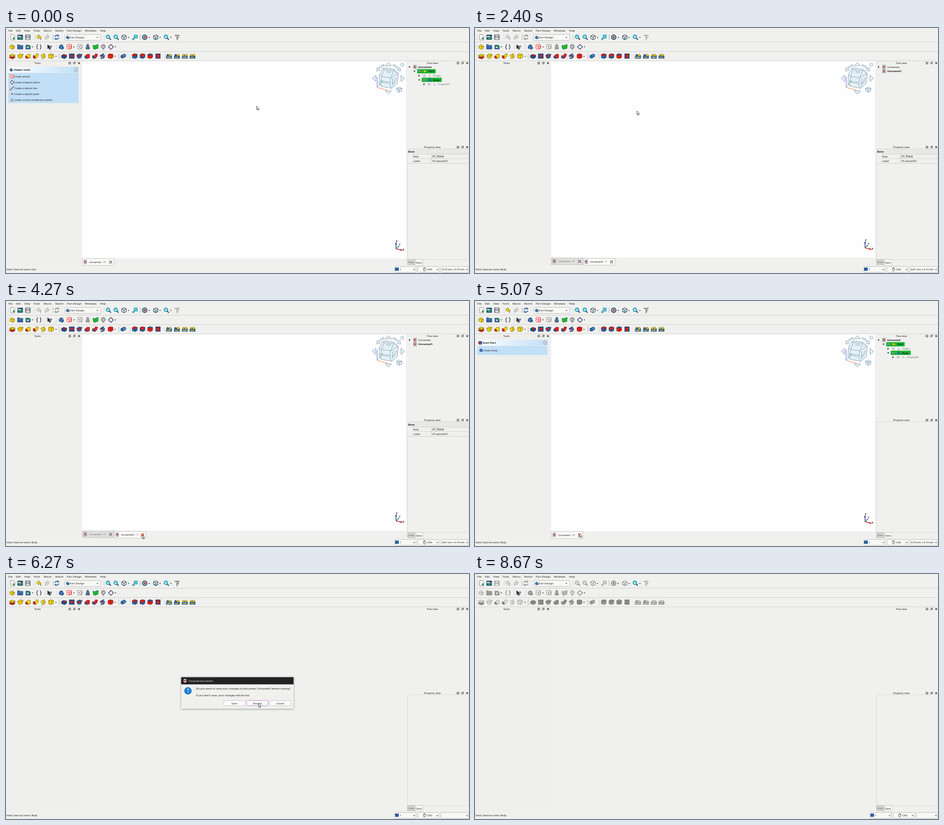
Recreate the animation shown at these times as an HTML page. Size 1028 by 545 pixels, loop 8800 ms.

```html
<!DOCTYPE html>
<html lang="en">
<head>
<meta charset="utf-8">
<style>
html, body { margin: 0; width: 100%; height: 100%; overflow: hidden; background: #f0f0ee; }
svg { display: block; width: 1028px; height: 545px; font-family: "Noto Sans", "Open Sans", sans-serif; }
text { white-space: pre; }
.off { filter: grayscale(1) opacity(.62); }
</style>
</head>
<body>
<svg id="stage" viewBox="0 0 1028 545"></svg>
<script>
const LOOP = 8800;
const INK = '#222', RED = '#e8201b', BLUE = '#2f67a8', YEL = '#f3d414', TEAL = '#0d93aa', GREEN = '#22b14c', GRAY = '#999';
const EDGE = { [RED]: '#6d1013', [BLUE]: '#17335c', [YEL]: '#5e4c00' };

// Drawing helpers, all returning SVG markup
const path = (d, fill = 'none', stroke = EDGE[fill] || INK, w = .7) =>
  `<path d="${d}" fill="${fill}" stroke="${stroke}" stroke-width="${w}" stroke-linejoin="round"/>`;
const line = (d, stroke = INK, w = 1) => path(d, 'none', stroke, w);
const thick = (d, c, w = 2) => line(d, EDGE[c], w + 1.1) + line(d, c, w);
const rect = (x, y, w, h, fill, stroke = 'none', r = 0) =>
  `<rect x="${x}" y="${y}" width="${w}" height="${h}" rx="${r}" fill="${fill}" stroke="${stroke}"/>`;
const disc = (x, y, r, fill = 'none', stroke = EDGE[fill] || INK, w = .7) =>
  `<circle cx="${x}" cy="${y}" r="${r}" fill="${fill}" stroke="${stroke}" stroke-width="${w}"/>`;
const text = (x, y, s, size = 5.65, attrs = '') =>
  `<text x="${x}" y="${y + 2.1}" font-size="${size}" fill="#1c1c1c" ${attrs}>${s}</text>`;
const MID = 'text-anchor="middle" ', BOLD = 'font-weight="700" ';
const at = (x, y, s, k = 1, attrs = '') => `<g transform="translate(${x} ${y}) scale(${k})" ${attrs}>${s}</g>`;
const when = (states, s) => `<g data-show="${states}">${s}</g>`;
const arrow = (x, y) => path(`M${x - 2} ${y - 1}h4l-2 2.4z`, '#555', 'none');
const grip = (x, y) => line(`M${x - 1} ${y - 5}v11M${x + 1} ${y - 5}v11`, '#d0d0ce', .6);
const bar = (x, y) => line(`M${x} ${y - 6}v12`, '#888', .7);
const cross = (x, y, r, c, w) => line(`M${x - r} ${y - r}l${2 * r} ${2 * r}m0 ${-2 * r}l${-2 * r} ${2 * r}`, c, w);

// Icons, centred on 0,0 and about 12 units wide
const box = c => path('M-5.5-3.2L-1-5.5 5.5-3.8V3L1 5.5-5.5 4z', c) + line('M-5.5-3.2L1-1.4 5.5-3.8M1-1.4V5.5', EDGE[c], .6);
const slab = (y, c) => path(`M-6 ${y}l5-2.6 7 2-5 3.2z`, c) + path(`M-6 ${y}l7 2.6 5-3.2v1.8l-5 3.2-7-2.4z`, c);
const wedge = (c, d) => path('M-5.5 0L0-4.5 5-4V4L-1 5.5-5.5 4z', c) + path('M-5.5 0L-1 1.2V5.5L-5.5 4z', d);
const bend = (c, d) => path('M-5.5-1Q0 0 1-5.5l5 1.2Q5 4-1 5.5L-5.5 4z', c) + path('M-5.5-1L-1 .2V5.5L-5.5 4z', d);
const coil = c => thick('M-4 5Q4 4 3 1T-3-1 3-5M-5 1L5-1', c, 1.6);
const turn = (c, d) => path('M-6-2L-1-5 6-4 3.5 4-2 5.5-5 3z', c) + path('M-6-2L1-.8 6-4 3.5-1 0 1.5-5 .5z', d, EDGE[d], .4);
const folder = path('M-6-5h4l1 1.5h7V5H-6z', BLUE) + line('M-6-2H6', '#7fa8d8', .7);
const lens = disc(-1, -1, 3.8, '#d6f3f7', TEAL, 1.9) + line('M2 2l3.5 3.5', '#235', 2);
const page = path('M-4-6h6l3 3V6h-9z', '#fff', '#555');
const sketch = rect(-5.5, -5.5, 10, 10, '#fff', RED, 1) + disc(1.5, 0, 2.6, 'none', RED, 1.1) + line('M-4-3l4 6', RED);
const plane = path('M0-5.5L5.5 0 0 5.5-5.5 0z', '#e9f0fa', '#23427f', 1.4) + disc(0, -5, 1.1, RED, 'none') + disc(0, 5, 1.1, RED, 'none');
const body = path('M-5-2L-1-5 3-4V-1L5 0V4L1 5.5-5 3z', BLUE) + line('M-5-2L0 0 3-1.5M0 0V5', '#8fb5e6', .6);
const part = path('M-5-2L-2-5 2-4V-1L5-2V3L1 5.5-5 3z', YEL) + line('M-5-2L1 0 5-2M1 0V5', '#6b5900', .6);
const axes = line('M-1-5V2L-5 5M-1 2L5 4', INK, 1);
const undo = path('M-6-1L-1-6V-3Q6-3 3 6 3 0-1 1V4z', YEL);
const redo = `<g transform="scale(-1 1)">${undo}</g>`;
const cycle = line('M-4.5-1Q-3-5 2-4M4.5 1Q3 5-2 4', BLUE, 2) + path('M1-6.5L6-3.5 1.5-1zM-1 6.5L-6 3.5-1.5 1z', BLUE, 'none');
const hexagon = line('M0-5.5L5-3V3L0 5.5-5 3V-3zM-5-3L0 0 5-3M0 0V5.5', '#345', 1.1);
const disk = rect(-5.5, -5.5, 11, 11, '#828a8e', '#666d70', 1) + rect(-3, -5, 6, 4, '#c3ccd0') + rect(-3.5, 1, 7, 4, '#dfe3e4');
const chain = n => path('M-6 0l4-2 8 1V5H-6z', n % 2 ? BLUE : '#477fbd') + disc(-3, -2, 2, n > 1 ? YEL : BLUE) + disc(2.5, -2, 2.4, YEL) + line('M-4 3h7', YEL, 1.5);

const ALL = 'ABCDE', DOC = 'ABCD', EDIT = 'ACD';
const icon = (x, y, s, on = DOC) => at(x, y, s, 1, `data-on="${on}"`);

const rowOne = [
  [14.5, page + line('M0 2.5h5M2.5 0v5', '#1c7a2a', 1.7), ALL],
  [31.5, rect(-5.5, -5, 11, 10, '#1f4f8c', '#173f74') + path('M-5-3h5l2 2h3V0H-5z', '#dfe6a0', 'none') + path('M-4 4L0-1 5 4z', GREEN, 'none'), ALL],
  [48.5, disk], [74, undo, EDIT], [91, redo, ''], [113, cycle, EDIT],
  [227.5, lens + path('M-2.5-1h3M-1-2.5v3', 'none', TEAL)], [244.5, lens + disc(-1, -1, 1.1, TEAL, 'none')],
  [262, hexagon], [286.5, rect(-2, -5, 7, 7, '#65c8d8', TEAL) + line('M-6 5.5L0 0M-5 1.5v3.5h4', TEAL, 1.3)],
  [308, disc(0, 0, 5, '#9fb8c4', '#24506e', 1.8) + rect(-2, -1.5, 4, 3.2, RED)],
  [332.5, hexagon + line('M-5 2L0 4 5 2', TEAL, 1.2)], [356, lens + path('M-3-1h4', 'none', TEAL), ALL],
  [380, path('M-5-5H5v2H1V6h-2V-3h-4zM1 0h3v1.5H1z', '#999', '#666', .5), EDIT]];
const rowTwo = [
  [14, part], [31.5, folder],
  [49, path('M-5-4H1v2h-4v5h6V1l2-1V5H-5z', BLUE) + path('M0-2h2v-3l4 4-4 3V0H-1z', GREEN, '#165')],
  [73, line('M-2-5q-2 0-2 2v2l-1.5 1L-4 1v2q0 2 2 2M2-5q2 0 2 2v2l1.5 1L4 1v2q0 2-2 2', '#345', 1.4)],
  [97.5, path('M-5-5L2 1H-1L1 5-1 6-3 2-5 4z', '#333') + `<text x="0" y="5" font-size="10" ${BOLD} fill="#1f4f8f">?</text>`, ALL],
  [123, body], [141, sketch], [164.5, sketch, ''],
  [181.5, path('M-4 5Q-4-1-2-2a2.5 2.5 0 1 1 4 0Q4-1 4 5z', '#4a7190', '#234'), EDIT],
  [199, path('M-6-4Q-2-2 1-4T6-5L5 4Q2 3 0 5T-5 4z', '#20b52c', '#064')],
  [216, disc(0, -1, 4.8, '#aaa', '#777') + disc(0, 0, 2.3, '#e2e2e0', '#777') + path('M-2 3h4l-1 3h-2z', '#aaa', '#777')],
  [233, plane]];
const rowThree = [
  [14, slab(2, RED) + slab(-2, YEL)], [32, turn(YEL, YEL)], [49, wedge(YEL, RED)], [66, bend(YEL, RED)],
  [83, coil(YEL)], [100, box(YEL)],
  [129, slab(1.5, BLUE) + slab(-1.5, BLUE) + path('M-3-1l2-2.5 5 1.2-2 3z', RED)], [146, rect(-5.5, -5, 11, 10, BLUE, EDGE[BLUE]) + path('M-2-3h5v7l-5-2z', RED)],
  [163, turn(BLUE, RED)], [180.5, wedge(RED, BLUE)], [197.5, bend(RED, BLUE)], [214.5, coil(BLUE) + line('M-3-3L4 4', RED, 1.2)],
  [232, box(RED)], [260.5, disc(-2, 1, 3.8, BLUE) + disc(2, -1, 3.8, '#477fbd', EDGE[BLUE])],
  [286, box(BLUE) + path('M-5.5-3.2L-1-5.5 5.5-3.8 1-1.4V1Q-2-2-5.5-1z', RED)], [303, box(BLUE) + path('M-5.5 0L-1-5.5 5.5-3.8 1 2z', RED)],
  [320, box(RED) + path('M-5.5-3.2L-1-5.5 5.5-3.8 1-1.4z', BLUE)], [337.5, rect(-5, -5, 10, 10, BLUE, EDGE[BLUE]) + path('M-3-4h6v6l-3 3-3-3z', RED)],
  ...[362, 379.5, 397, 414].map((x, n) => [x, chain(n)])];
const toolbar = (row, y) => row.map(([x, s, on]) => icon(x, y, s, on)).join('');

const bars = () => {
  const menus = [['File', 5], ['Edit', 22], ['View', 40.5], ['Tools', 61], ['Macro', 83.5], ['Sketch', 109], ['Part Design', 135], ['Windows', 175], ['Help', 208.5]];
  return menus.map(([s, x]) => text(x, 6, s, 6.05)).join('') +
    line('M0 31.5H1028M0 52.5H1028M0 73H1028', '#cbcbc9', .9) +
    [5, 65, 218].map(x => grip(x, 20.5)).join('') + [5, 88, 112].map(x => grip(x, 42)).join('') +
    [5, 276, 353].map(x => grip(x, 63)).join('') + bar(104.5, 20.5) + bar(298, 20.5) + bar(118, 63) + bar(250.5, 63) +
    rect(130.5, 14.5, 80, 13, '#f8f8f7', '#bdbdbb', 1) + at(137, 21, body, .65) + text(141, 21, 'Part Design', 6.05) +
    toolbar(rowOne, 20.5) + toolbar(rowTwo, 42) + toolbar(rowThree, 62.5) +
    [203, 272, 318, 342, 366].map(x => arrow(x, 21)).join('') + [59, 151, 243].map(x => arrow(x, 42)).join('') +
    arrow(111, 63) + arrow(242, 63);
};

const dockTitle = (x, y, s, bx) => text(x, y, s, 5.65, MID) +
  rect(bx - 2, y - 2, 4, 4, 'none', '#555') + line(`M${bx - 2} ${y}h4`, '#555', .7) +
  line(`M${bx + 8} ${y - 1}h3v3h-3zM${bx + 9.5} ${y - 1}v-1.3h3v3h-1.5`, '#444', .8) + cross(bx + 20.5, y, 1.9, '#222', 1.2);

const docIcon = (x, y) => at(x, y, rect(-2.8, -3.7, 5.6, 7.4, '#f4f6f8', '#667') + disc(0, 0, 1.9, '#c0262e', 'none'));
const eye = (x, y, c) => path(`M${x - 3.2} ${y}q3.2-4 6.4 0q-3.2 4-6.4 0z`, '#fff', c, .8) + disc(x, y, 1.1, c, 'none');
const hidden = (x, y) => eye(x, y, GRAY) + line(`M${x - 2.5} ${y - 2.5}l5 5`, GRAY, .8);
const fold = (x, y, open) => path(open ? `M${x - 2.4} ${y - 1}h4.8l-2.4 2.8z` : `M${x - 1} ${y - 2.4}v4.8l2.8-2.4z`, '#222', 'none');

const treeA = () => fold(896, 86.5, 1) + docIcon(908, 86.5) + text(915, 86.5, 'Unnamed', 6.05, BOLD) +
  fold(907, 96, 1) + rect(913, 91.5, 41, 9.5, '#15b735') + eye(918.5, 96, '#143') + at(930, 96, part, .6) + text(938, 96, 'Part', 5.9, BOLD) +
  fold(917, 106, 0) + hidden(929, 106) + at(941, 106, axes, .6, 'opacity=".55"') + text(948, 106, 'Origin', 5.85, 'opacity=".6"') +
  fold(917.5, 115.5, 1) + rect(923, 110.5, 44.5, 9.5, '#15b735') + eye(929, 115.5, '#143') + at(941, 115.5, body, .6) + text(948, 115.5, 'Body', 5.9, BOLD) +
  fold(928, 125, 0) + hidden(939.5, 125) + at(951.5, 125, axes, .6, 'opacity=".55"') + text(959, 125, 'Origin001', 5.85, 'opacity=".6"');
const treeB = () => fold(896, 86.5, 0) + docIcon(908, 86.5) + text(915, 86.5, 'Unnamed', 5.85) + docIcon(908, 96) + text(915, 96, 'Unnamed1', 5.9, BOLD);

const properties = () => rect(891.5, 269, 136, 11, '#e8e8e6') + text(893, 275, 'Base', 6, BOLD) +
  line('M902 280.5H1027M902 290.5H1027M891 301H1027M944.5 280V301', '#c6c6c4', .8) +
  text(904, 285.5, 'Role', 6) + text(946.5, 285.5, 'XY_Plane', 6.2) + text(904, 296.3, 'Label', 6) + text(946.5, 296.3, 'XY-plane001', 6.1);

const panel = (h, title, ico) => rect(5, 86, 156, 13.5, 'url(#head)') + rect(5, 100, 156, h, '#c1dff6') +
  at(11.5, 93, ico, .65) + text(17, 93, title, 6.05, BOLD) + disc(155.5, 92.5, 4, '#eef5fb', '#557', .6) +
  line('M153.7 92l1.8-1.6 1.8 1.6m-3.6 2.6l1.8-1.6 1.8 1.6', '#335', .7);
const helper = () => panel(67, 'Helper tools', body) +
  [['Create sketch', sketch], ['Create a datum plane', plane], ['Create a datum line', line('M-5 5L5-5', '#7a1f2b', 1.6) + disc(-5, 5, 1.2, RED)],
   ['Create a datum point', disc(0, 0, 2, '#3a4f9a', RED)], ['Create a local coordinate system', axes]]
    .map(([s, i], n) => at(13.5, 108 + n * 12.9, i, .75) + text(18, 108 + n * 12.9, s, 5.6)).join('');
const starter = () => panel(20, 'Start Part', rect(-5.5, -5, 11, 10, BLUE, EDGE[BLUE]) + rect(-5, -2, 6, 6.5, RED)) +
  at(13.5, 109.5, body, .65) + text(18, 109.5, 'Create body', 5.6);

const cube = () => {
  const sky = '#e4f0f8', edge = '#70899b', p = d => path(d, sky, edge, .8);
  const label = (x, y, a, s, size) => `<text transform="translate(${x} ${y}) rotate(${a})" font-size="${size}" fill="#7d95a6" ${MID}>${s}</text>`;
  return p('M849 77l7 7h-14zM849 147l7-7h-14zM813 112l8-7v14zM885 112l-8-7v14z') +
    p('M823 96l1-8 2 2q6-7 13-9l1 3q-7 2-12 8l2 2zM876 96l-1-8-2 2q-6-7-13-9l-1 3q7 2 12 8l-2 2z') +
    disc(880, 81.5, 3.6, sky, edge) + p('M867.5 134l5.5-2.5 6 2.5v6l-6 3-5.5-3z') + line('M867.5 134l5.5 2.5 6-2.5M873 136.5v6.5', '#557', .7) +
    p('M836 91L842 88 862 92 871 101 869 123 857 134 834 130 828 124 829 104z') +
    line('M829 104L834 108 854 111 871 101M834 108L832 126 834 130M854 111L852 129 857 134M836 91L840 92 861 95 862 92M840 92L834 108M861 95L854 111M859 112L857 130M863 96L870 102', edge, .7) +
    label(849, 100, 10, 'TOP', 6) + label(841, 123, 9, 'FRONT', 6.6) + label(865, 119, -58, 'RIGHT', 5.6) +
    line('M824 108v24', '#7d74e8', 1.2) + line('M824 132l24 7', '#f08060', 1.2) + line('M824 132l13-16', '#68c890', 1.1);
};
const triad = () => line('M866 491V479', '#1b1b8f', 1.4) + path('M864.2 481l1.8-5 1.8 5z', '#1b1b8f', 'none') +
  line('M866 491l11 3', '#c01818', 1.4) + path('M876 491.7l5.5 2.8-6 .9z', '#c01818', 'none') +
  line('M866 491l5-4.5', '#188038', 1.2) + path('M869 486l4-2-1.5 4z', '#188038', 'none') +
  text(867.5, 474, 'Z', 5.8, MID + BOLD) + text(874, 482, 'Y', 5.4, MID + BOLD) + text(882.5, 493, 'X', 5.8, MID + BOLD);

const tab = (x, y, s, active, id) => rect(x + .5, y, 70.5, 15, active ? '#fbfbfa' : '#dededc', '#c2c2c0') + docIcon(x + 7, y + 7.2) +
  text(x + 15.5, y + 7.6, s, 5.7, active ? '' : 'opacity=".55"') + `<g data-close="${id}" stroke="#777">` +
  `<path d="M${x + 60} ${y + 4.6}l6.4 6.4m0-6.4l-6.4 6.4" stroke-width="1.7"/></g>`;

const combo = (x, w, s) => rect(x + .5, 530.5, w, 13, '#f8f8f7', '#bdbdbb', 1) + s + arrow(x + w - 3.5, 537.5);
const combos = () => combo(863, 47, rect(864.5, 533.5, 7, 6, '#2a66b0', '#1d4a85') + text(874, 537, '1', 6)) +
  combo(914, 47, rect(927, 533, 4, 7.5, '#fff', '#444', 2) + line('M929 533v3', '#444', .8) + text(934, 537, 'CAD', 6));

const button = (x, s, id) => `<rect id="${id}" x="${x}" y="281.5" width="47.5" height="11.5" rx="1.5" fill="#fafafa" stroke="#c4c4c2"/>` + text(x + 23.7, 287.5, s, 5.6, MID);
const dialog = () => `<g filter="url(#shadow)">${rect(389, 229.5, 249.5, 70, '#f0f0ee')}</g>` +
  `<rect id="caption" x="389" y="229.5" width="249.5" height="16" fill="#343434"/>` + docIcon(397.5, 237.5) +
  text(405, 237.5, 'Unsaved document', 6.02, 'style="fill:#f2f2f2"') + `<g id="shut">${cross(630.3, 237.5, 2.4, '#eee', .9)}</g>` +
  disc(404, 260, 8.3, '#1e7fd0', 'none') + `<text x="404" y="264.3" font-size="12" fill="#fff" ${MID}>?</text>` +
  text(422, 255.3, "Do you want to save your changes to document 'Unnamed' before closing?", 5.97) +
  text(422, 270.3, "If you don't save, your changes will be lost.", 5.97) +
  button(483.5, 'Save', 'save') + button(534.3, 'Discard', 'discard') + button(585, 'Cancel', 'cancel');

const $ = id => document.getElementById(id);
$('stage').innerHTML = `<defs>
  <linearGradient id="head"><stop stop-color="#fff"/><stop offset="1" stop-color="#c1dff6"/></linearGradient>
  <filter id="shadow" x="-10%" y="-20%" width="120%" height="140%"><feDropShadow dx="0" dy="1" stdDeviation="2.2" flood-opacity=".42"/></filter></defs>` +
  rect(0, 0, 1028, 545, '#f0f0ee') + rect(0, 73, 167, 455, '#efefed') +
  when('ABC', rect(169, 73.5, 719, 439, '#fefefe') + cube()) + bars() +
  when('B', rect(169, 510.8, 719, 3, '#f0f0ee') + at(0, -2, triad()) + tab(169, 511.5, 'Unnamed : 1*', 0, '') + tab(240, 512.5, 'Unnamed1 : 1', 1, 'new')) +
  when('AC', triad() + tab(169, 513, 'Unnamed : 1*', 1, 'old')) +
  dockTitle(70, 78, 'Tasks', 141.5) + dockTitle(946.5, 78, 'Tree view', 1003.5) + dockTitle(946.5, 265, 'Property view', 1003.5) +
  rect(891.5, 268.5, 136, 246.5, 'none', '#dadad8') +
  when('A', helper()) + when('C', starter()) + when('AC', treeA()) + when('B', treeB()) + when('AB', properties()) +
  rect(891.5, 515, 16.5, 11.5, '#d4d4d2', '#b9b9b7') + text(899.5, 520.8, 'View', 5.7, MID + 'opacity=".6"') +
  rect(908.5, 515, 17, 13, '#f8f8f7', '#c8c8c6') + text(916.5, 521.8, 'Data', 5.8, MID) +
  `<text id="status" x="1" y="539" font-size="5.55" fill="#1c1c1c"></text><g id="combos">${combos()}</g>` +
  `<rect id="sizeBox" y="530.5" height="13" rx="1" fill="#f8f8f7" stroke="#bdbdbb"/>` + arrow(1023.5, 537.5) +
  when('AC', text(968, 537, '6;79 mm x 4;14 mm', 5.45)) + when('B', text(968, 537, '6;81 mm x 4;14 mm', 5.45)) +
  `<g id="dialog">${dialog()}</g>` +
  `<g id="cursor">${path('M0 0V8.4L1.9 6.7 3.3 9.8 4.6 9.2 3.2 6.2H5.8z', '#fff', '#222', .8)}</g>`;

// Pointer route: time, x, y
const route = [
  [40, 556.5, 173.5], [130, 281.5, 95.5], [270, 281.5, 95.5], [500, 240, 64], [1130, 900, 115], [1200, 900, 115],
  [1530, 4.5, 51.5], [1800, 14, 19], [2130, 14, 19], [2400, 359.5, 184.5], [2530, 373.5, 190], [2730, 373.5, 190],
  [3130, 50, 40], [3600, 180, 300], [3670, 180, 300], [4130, 302, 520], [4600, 302, 520], [4950, 232, 517],
  [5130, 232, 517], [5470, 342.5, 440.5], [5530, 342.5, 440.5], [6000, 560.5, 287.5], [6470, 560.5, 287.5],
  [6750, 717, 310], [7200, 296, 364.5], [8400, 296, 364.5], [8670, 36, 547]];
function pointer(t) {
  const n = route.findIndex(k => k[0] > t);
  if (n <= 0) return route[n ? route.length - 1 : 0].slice(1);
  const [t0, x0, y0] = route[n - 1], [t1, x1, y1] = route[n];
  const u = (t - t0) / (t1 - t0), e = u * u * (3 - 2 * u);
  return [x0 + (x1 - x0) * e, y0 + (y1 - y0) * e];
}

const shows = document.querySelectorAll('[data-show]'), icons = document.querySelectorAll('[data-on]');
const closers = document.querySelectorAll('[data-close]');
let last = '';
function draw(now) {
  const t = now % LOOP, [x, y] = pointer(t);
  const state = t < 2130 ? 'A' : t < 4470 ? 'B' : t < 6230 ? 'C' : t < 6470 ? 'D' : 'E';
  if (state !== last) {
    shows.forEach(g => g.style.display = g.dataset.show.includes(state) ? '' : 'none');
    icons.forEach(g => g.classList.toggle('off', !g.dataset.on.includes(state)));
    last = state;
  }
  $('cursor').setAttribute('transform', `translate(${x} ${y})`);
  $('status').textContent = t > 1800 && t < 2200 ? '' : 'Valid, Internal name: ' + (t < 1000 ? 'Part' : 'Body');
  closers.forEach(g => {
    const cx = g.dataset.close === 'new' ? 303 : 232;
    const hot = g.dataset.close && Math.abs(x - cx) < 4 && Math.abs(y - 519) < 5;
    g.setAttribute('stroke', hot ? '#e02010' : '#777');
  });

  const shift = t < 6330 ? 0 : 14;
  $('combos').setAttribute('transform', `translate(${shift} 0)`);
  $('sizeBox').setAttribute('x', 965.5 + shift);
  $('sizeBox').setAttribute('width', 61.5 - shift);

  const closing = t >= 6230, over = x > 534 && x < 582 && y > 281 && y < 293;
  $('dialog').style.display = t >= 5130 && t < 6380 ? '' : 'none';
  $('dialog').style.opacity = Math.min(1, (t - 5130) / 130);
  $('caption').setAttribute('fill', closing ? '#222' : '#343434');
  $('shut').style.display = closing ? 'none' : '';
  $('save').setAttribute('stroke', over ? '#c4c4c2' : '#b5aee6');
  $('discard').setAttribute('stroke', over ? '#c48ad0' : '#c4c4c2');
}
const start = performance.now();
(function tick() {
  draw(performance.now() - start);
  requestAnimationFrame(tick);
})();
</script>
</body>
</html>
```
